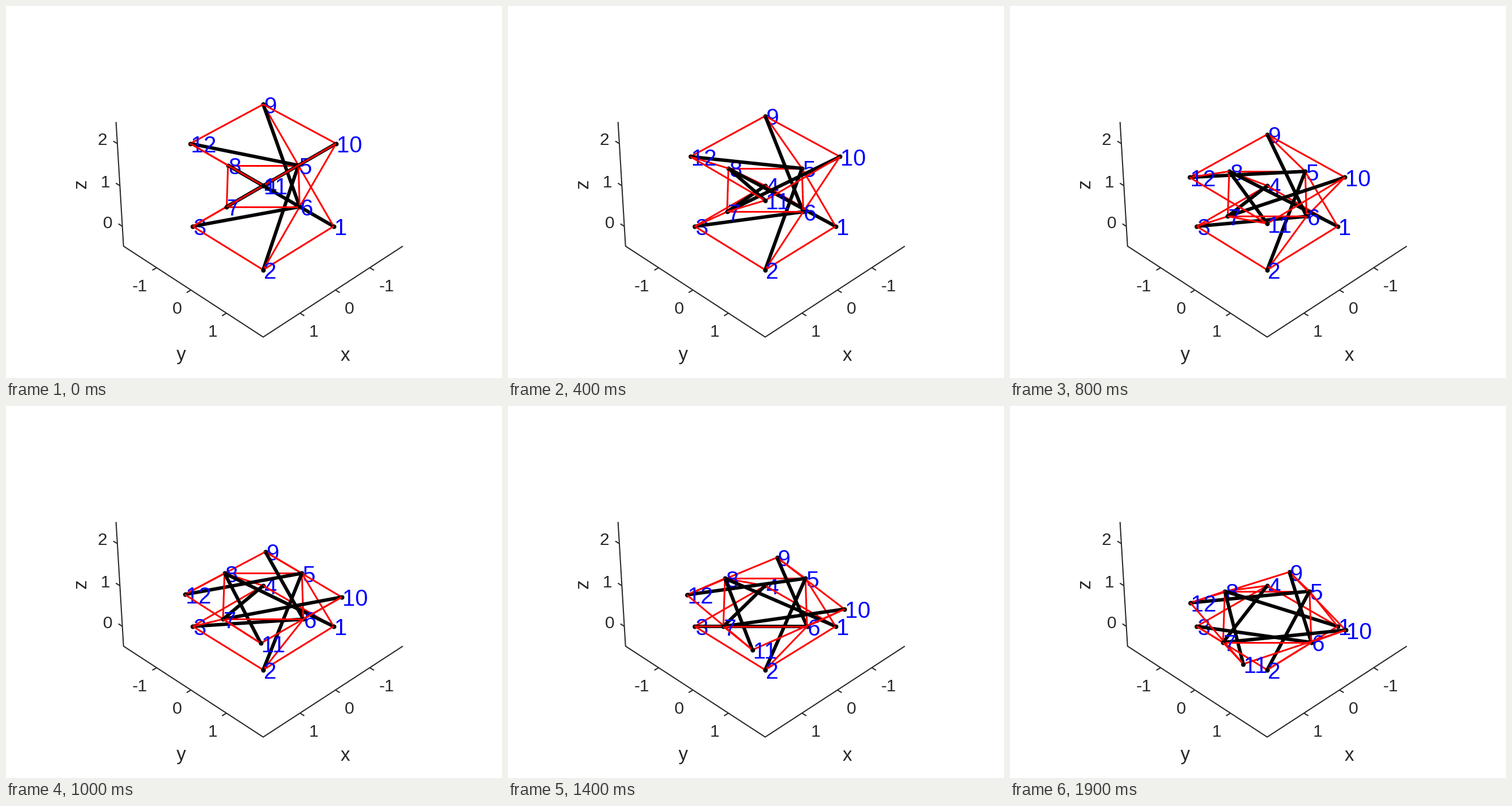
A matplotlib script for the animation above (2 s loop, 864 by 648 pixels).

```python
import numpy as np
import matplotlib.pyplot as plt
from matplotlib.animation import FuncAnimation

W, H, DPI = 864, 648, 100
PX = 72 / DPI
FRAMES, STEP = 20, 100
INK = (0.15, 0.15, 0.15)

# ---- perspective camera looking along (1, 1, 1) at (0, 0, 1) ----
SIN, COS = np.sqrt(1 / 3), np.sqrt(2 / 3)
DIST, FOCUS = 33.2, 2930
CX, CY = 447.5, 312.5


def project(right, front, z):
    """Screen x, y and nearness of a point given along the viewer's axes."""
    near = front * COS + (z - 1) * SIN
    scale = FOCUS / (DIST - near)
    up = (z - 1) * COS - front * SIN
    return CX + right * scale, CY - up * scale, near


def project_xyz(x, y, z):
    return project((y - x) / np.sqrt(2), (x + y) / np.sqrt(2), z)[:2]


# ---- structure: three square rings joined by bars of constant length ----
BAR2 = 6            # squared bar length
BARS = [(1, 8), (2, 5), (3, 6), (4, 7), (5, 12), (6, 9), (7, 10), (8, 11)]
CABLES = [(a + i, a + (i + 1) % 4) for a in (1, 5, 9) for i in range(4)]
CABLES += [(5 + i, n + i) for n in (1, 9) for i in range(4)]


def joints(i):
    """Projected joints; the top sinks onto the middle ring, then twists."""
    r_mid = 1 + np.interp(i, [0, 4, 9, 14, 19], [0, 0.0457, 0.093, 0.153, 0.222])
    z_mid = np.sqrt(BAR2 - 1 - (r_mid + 1) ** 2)

    gap2 = max(0, 1 - 0.082 * i - 0.003 * i ** 2)
    late = max(0, i - 9.14)
    twist = 1.95 * late - 0.028 * late ** 2
    side = r_mid * np.cos(np.radians(45 + twist))
    r_top = np.sqrt(side ** 2 + BAR2 - r_mid ** 2 - gap2) - side

    rings = [(np.sqrt(2), 0, 0),
             (r_mid, z_mid, -45),
             (r_top, z_mid + np.sqrt(gap2), twist - 90)]
    pos = {}
    for k, (r, z, start) in enumerate(rings):
        for j in range(4):
            a = np.radians(start + 90 * j)
            pos[4 * k + j + 1] = project(r * np.cos(a), r * np.sin(a), z)
    return pos


fig = plt.figure(figsize=(W / DPI, H / DPI), dpi=DPI, facecolor="white")
plt.rcParams["font.family"] = "Liberation Sans"
ax = fig.add_axes([0, 0, 1, 1])
ax.set_xlim(-0.5, W - 0.5)
ax.set_ylim(H - 0.5, -0.5)
ax.axis("off")


def stroke(points, color, width):
    return ax.plot(*zip(*points), color=color, lw=width * PX, zorder=1,
                   solid_capstyle="butt", solid_joinstyle="round")[0]


def write(x, y, s, size, color=INK, **kw):
    return ax.text(x, y, s, size=size * PX, color=color, va="baseline",
                   zorder=1, **kw)


# ---- axes ----
def tick(start, end, value, dx, dy, ha):
    x, y = project_xyz(*start)
    stroke([(x, y), project_xyz(*end)], INK, 2)
    write(x + dx, y + dy, str(value), 30, ha=ha)


corners = [(2, -2, 2.5), (2, -2, -0.5), (2, 2, -0.5), (-2, 2, -0.5)]
stroke([project_xyz(*c) for c in corners], INK, 2)
for v in (-1, 0, 1):
    tick((v, 2, -0.5), (v, 2.115, -0.5), v, 16, 41, "left")
    tick((2, v, -0.5), (2.115, v, -0.5), v, -16, 41, "right")
    tick((2, -2, v + 1), (2, -2.12, v + 1), v + 1, -17.5, 2.7, "right")
write(590, 617, "x", 33, ha="center")
write(305, 617, "y", 33, ha="center")
write(139.5, 309, "z", 33, ha="center", rotation=90, rotation_mode="anchor")

# ---- moving parts ----
members = [(pair, stroke([(0, 0)], color, width))
           for pairs, color, width in ((BARS, "black", 6), (CABLES, "red", 3))
           for pair in pairs]
dots = {n: ax.plot([], [], "o", color="black", ms=8 * PX, mew=0)[0]
        for n in range(1, 13)}
labels = {n: write(0, 0, str(n), 40, "blue", ha="left") for n in dots}


def draw(i):
    pos = joints(i)
    for (a, b), line in members:
        xs, ys, near = zip(pos[a], pos[b])
        line.set_data(xs, ys)
        line.set_zorder(10 + sum(near) / 2)
    for n, (x, y, near) in pos.items():
        dots[n].set_data([x], [y])
        dots[n].set_zorder(10 + near)
        labels[n].set_position((x + 1, y + 15.5))
        labels[n].set_zorder(10.001 + near)
    return []


anim = FuncAnimation(fig, draw, frames=FRAMES, interval=STEP,
                     init_func=lambda: draw(0), repeat=True, repeat_delay=0)
plt.show()
```
